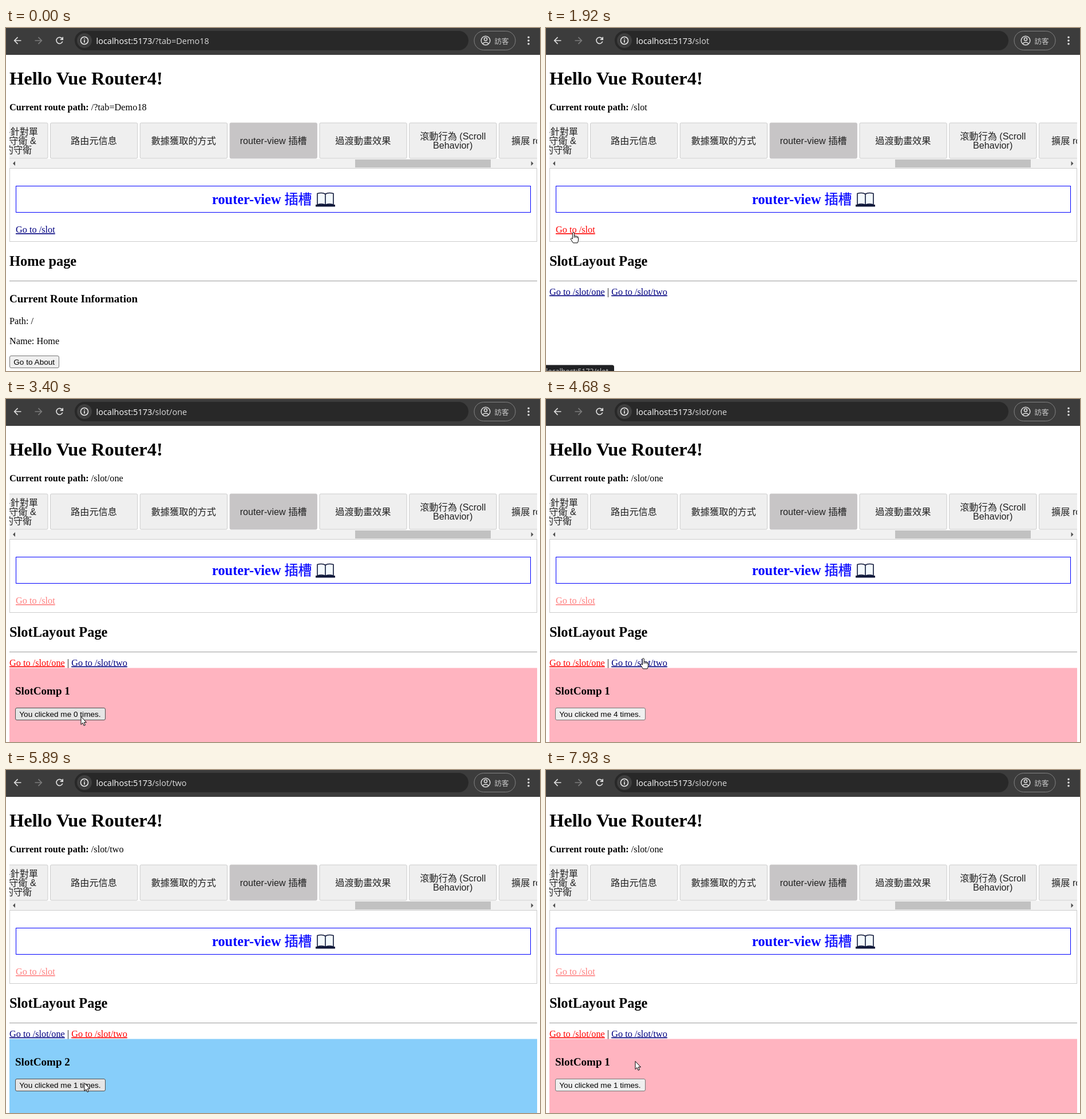
These frames come from a looping animation (933x600 px, 8000 ms). An HTML page:

```html
<!DOCTYPE html>
<html lang="zh-Hant">
<head>
<meta charset="utf-8">
<title>Vue Router demo</title>
<style>
  html, body { margin: 0; width: 100%; height: 100%; overflow: hidden; background: #fff; }
  svg { display: block; }
  text { font: 16.3px "Liberation Serif", "Times New Roman", serif; white-space: pre; }
  .h1 { font-size: 32.6px; font-weight: 700; }
  .h2 { font-size: 24.4px; font-weight: 700; }
  .h3 { font-size: 19.07px; font-weight: 700; }
  .b { font-weight: 700; }
  .ui { font: 14.5px "Open Sans", "Noto Sans", sans-serif; }
  .tab text { font: 300 16.2px "Liberation Sans", "Noto Sans CJK TC", "Noto Sans CJK JP", sans-serif; text-anchor: middle; fill: #222; }
  .tab rect { fill: #efefef; stroke: #ccc; }
  .tab .on { fill: #c7c5c6; stroke: #c7c5c6; }
  .btn text { font: 13.6px "Liberation Sans", Arial, sans-serif; }
  .btn rect { fill: #efefef; stroke: #767676; }
  .btn.hover rect { fill: #e5e5e5; stroke: #4f4f4f; }
  .cjk { font-family: "Noto Sans CJK TC", "Noto Sans CJK JP", sans-serif; }
  .link { fill: #000080; text-decoration: underline; }
  .link.active { fill: #ff7f7f; }
  .link.exact { fill: #f00; }
  .line { fill: none; stroke: #ddd; stroke-width: 1.7; }
</style>
</head>
<body>
<svg width="933" height="600" viewBox="0 0 933 600">
  <defs><clipPath id="strip"><rect x="6" y="160" width="922" height="72"/></clipPath></defs>
  <rect width="933" height="600" fill="#fff"/>

  <!-- browser bar -->
  <rect width="933" height="47" fill="#3c3c3c"/>
  <rect x="120" y="5" width="688" height="34" rx="17" fill="#282828"/>
  <g class="line">
    <path d="M26.5 22H15M20.5 16.2L14.7 22L20.5 27.8"/>
    <path d="M50.5 22H62M56.5 16.2L62.3 22L56.5 27.8" stroke="#7b7b7b"/>
    <path d="M98.3 19A5.5 5.5 0 1 0 98.8 23.5M99.2 15.8V20.2H94.8"/>
    <circle cx="137" cy="22" r="13" fill="#3e3e3e" stroke="none"/>
    <circle cx="137" cy="22" r="6.5" stroke="#eee" stroke-width="1.5"/>
    <path d="M137 21V25.5M137 18.2V19.8" stroke="#eee"/>
    <rect x="818" y="5.5" width="72" height="33" rx="16.5" stroke="#838383" stroke-width="1"/>
    <g stroke-width="1.5">
      <circle cx="838" cy="22" r="7.8"/>
      <circle cx="838" cy="19.5" r="2.6"/>
      <path d="M832.8 27.3Q838 22.8 843.2 27.3"/>
    </g>
    <path d="M913 16.2V28" stroke-width="3.6" stroke-linecap="round" stroke-dasharray="0 5.8"/>
  </g>
  <text class="cjk" x="853.5" y="27.5" fill="#ccc" style="font-size:12.5px">訪客</text>
  <text class="ui" x="157.5" y="27.5" fill="#fff">localhost:5173<tspan id="url" fill="#dadada"></tspan></text>

  <!-- page head -->
  <text class="h1" x="6" y="99">Hello Vue Router4!</text>
  <text x="6" y="144"><tspan class="b">Current route path:</tspan> <tspan id="path"></tspan></text>

  <g id="tabs" class="tab" clip-path="url(#strip)"></g>
  <rect x="6" y="229" width="922" height="16" fill="#f1f1f1"/>
  <rect x="610" y="230" width="237" height="14" fill="#c1c1c1"/>
  <path d="M16 233V241L12 237ZM917.5 233V241L921.5 237Z" fill="#505050"/>

  <rect x="6.5" y="245.5" width="921" height="128" fill="none" stroke="#ccc"/>
  <rect x="17.5" y="276.5" width="899" height="46" fill="none" stroke="#00f"/>
  <text class="h2" x="360" y="308" fill="#00f">router-view</text>
  <text class="cjk" x="486.5" y="308" fill="#00f" stroke="#00f" stroke-width=".2" style="font-size:24px">插槽</text>
  <path d="M541 309H575V312.5H541Z" fill="#10183a"/>
  <path d="M544 289.5Q553 287 558 290.5Q563 287 572 289.5V309Q563 306.500 558 309.500Q553 306.500 544 309ZM558 290.500V309" fill="#f3fafd" stroke="#10183a" stroke-width="1.6"/>
  <text class="link" id="slot" x="17" y="358">Go to /slot</text>

  <!-- routed view -->
  <text class="h2" id="title" x="6" y="416"></text>
  <path d="M6 442.5H928" stroke="#9a9a9a"/>
  <g id="home">
    <text class="h3" x="6" y="480">Current Route Information</text>
    <text x="6" y="518">Path: /</text>
    <text x="6" y="553">Name: Home</text>
    <g class="btn"><rect x="6.5" y="573.5" width="86" height="21" rx="2.5"/><text x="13.3" y="588.5">Go to About</text></g>
  </g>
  <g id="layout">
    <text class="link" id="one" x="6" y="466.5">Go to /slot/one</text>
    <text x="107" y="466.5">|</text>
    <text class="link" id="two" x="114.2" y="466.5">Go to /slot/two</text>
  </g>
  <g id="comp">
    <rect id="fill" x="6" y="470.5" width="922" height="130"/>
    <text class="h3" id="name" x="16" y="517"></text>
    <g class="btn" id="counter"><rect x="16.5" y="540.5" width="157" height="21" rx="2.5"/><text id="count" x="23.3" y="555.5"></text></g>
  </g>

  <g id="status">
    <rect id="bubble" x="-6" y="589.5" height="20" rx="3.5" fill="#202124"/>
    <text class="ui" id="hint" x="0" y="605" fill="#d0d0d0" style="font-size:12.4px"></text>
  </g>

  <circle id="press" r="12" fill="#f7ea3c" style="mix-blend-mode:multiply"/>
  <g id="cursor" fill="#fff" stroke="#000" stroke-linejoin="round">
    <path id="arrow" d="M0 .5V14.5L3.1 11.500L5.100 16.300L7.400 15.300L5.400 10.700H9.500Z"/>
    <path id="hand" d="M-1.7 1.5Q-.2-.5 1.3 1.5V7Q2.8 5.8 4 7.3Q5.5 6.5 6.5 8Q8.5 7.7 8.5 9.8V14Q8.3 16.5 7 18.9H-.5Q-2 16.5-4.5 13Q-5.3 11-3.5 10.5L-1.7 12ZM1.3 7V10M4 7.5V10M6.5 8.5V10.5"/>
  </g>
</svg>
<script>
const LOOP = 8000, START = 260, STEP = 200 / 3;
const $ = id => document.getElementById(id);
const show = (id, on) => { $(id).style.display = on ? '' : 'none'; };

const labels = ['路由守衛-針對單|個路由的守衛 &amp;|組件內的守衛', '路由元信息', '數據獲取的方式', 'router-view 插槽',
  '過渡動畫效果', '滾動行為 (Scroll|Behavior)', '擴展 router API'];
$('tabs').innerHTML = labels.map((label, i) => {
  const x = 156.8 * i - 79.3, lines = label.split('|');
  return `<rect x="${x}" y="166" width="152.3" height="62" rx="2"${i === 3 ? ' class="on"' : ''}/>` +
    lines.map((s, k) => `<text x="${x + 76}" y="${203 + 16.4 * (k - (lines.length - 1) / 2)}">${s}</text>`).join('');
}).join('');

// places the pointer can act on: left, top, right, bottom
const areas = {
  slot: [17, 344, 86, 362],
  one: [6, 452, 103, 469],
  two: [114, 452, 212, 469],
  button: [16, 540, 174, 562],
};
// the visit: departure time and destination; everything else follows from moves and clicks
const moves = [[START, 34, 318], [940, 48, 357], [1930, 56, 460], [2670, 176, 567], [3060, 131, 555],
  [4410, 170, 453], [5300, 137, 547], [6200, 112, 477], [6580, 69, 464], [7260, 136, 546], [7700, 156, 509]];
const clicks = [1590, 2460, 3670, 3940, 4140, 4400, 5100, 5830, 6030, 7050, 7730];
const PRESS = 100, HINT_ON = 180, HINT_OFF = 330;

const ease = u => u * u * (3 - 2 * u);

// longer trips take longer
function pointer(t) {
  let x = 700, y = 585;
  for (const [start, tx, ty] of moves) {
    if (t < start) break;
    const time = 180 + 0.6 * Math.hypot(tx - x, ty - y);
    const u = ease(Math.min(1, (t - start) / time));
    x += (tx - x) * u;
    y += (ty - y) * u;
  }
  return [x, y];
}

function areaAt(t) {
  const [x, y] = pointer(t);
  return Object.keys(areas).find(k => {
    const [l, top, r, b] = areas[k];
    return x >= l && x <= r && y >= top && y <= b;
  });
}

const linkAt = t => {
  const area = areaAt(t);
  return area === 'button' ? undefined : area;
};
const routeOf = page => page === 'home' ? '/?tab=Demo18' : page === 'slot' ? '/slot' : '/slot/' + page;

// replay the clicks made so far
function stateAt(t) {
  let page = 'home', count = 0;
  for (const c of clicks.filter(c => c <= t)) {
    const link = linkAt(c);
    if (link) { page = link; count = 0; } else count++;
  }
  return { page, count };
}

// the status bubble comes late and lingers
function hintAt(t) {
  for (let d = HINT_ON; d <= HINT_OFF; d += 30) {
    const link = linkAt(t - d);
    if (link) return routeOf(link);
  }
  return '';
}

function draw(t) {
  const { page, count } = stateAt(t);
  const home = page === 'home', comp = page === 'one' || page === 'two';
  $('url').textContent = $('path').textContent = routeOf(page);
  $('title').textContent = home ? 'Home page' : 'SlotLayout Page';
  show('home', home);
  show('layout', !home);
  show('comp', comp);
  $('slot').classList.toggle('active', comp);
  for (const id of ['slot', 'one', 'two']) $(id).classList.toggle('exact', page === id);

  $('fill').setAttribute('fill', page === 'two' ? '#87cefa' : '#ffb4c0');
  $('name').textContent = 'SlotComp ' + (page === 'two' ? 2 : 1);
  $('count').textContent = `You clicked me ${count} times.`;

  // the pointer moves in 15 Hz steps
  const now = 252 + STEP * Math.floor((t - 252) / STEP);
  const hint = hintAt(now), area = areaAt(now), hand = !!area && area !== 'button';
  show('status', hint);
  $('hint').textContent = 'localhost:5173' + hint;
  $('bubble').setAttribute('width', 99 + 5.2 * hint.length);

  const place = `translate(${pointer(now).map(Math.round)})`;
  show('cursor', t >= START);
  show('hand', hand);
  show('arrow', !hand);
  $('cursor').setAttribute('transform', place);
  $('press').setAttribute('transform', place);
  show('press', clicks.some(c => t >= c - PRESS && t < c));
  $('counter').classList.toggle('hover', area === 'button');
}

const t0 = performance.now();
function tick() {
  draw((performance.now() - t0) % LOOP);
  requestAnimationFrame(tick);
}
tick();
</script>
</body>
</html>
```
